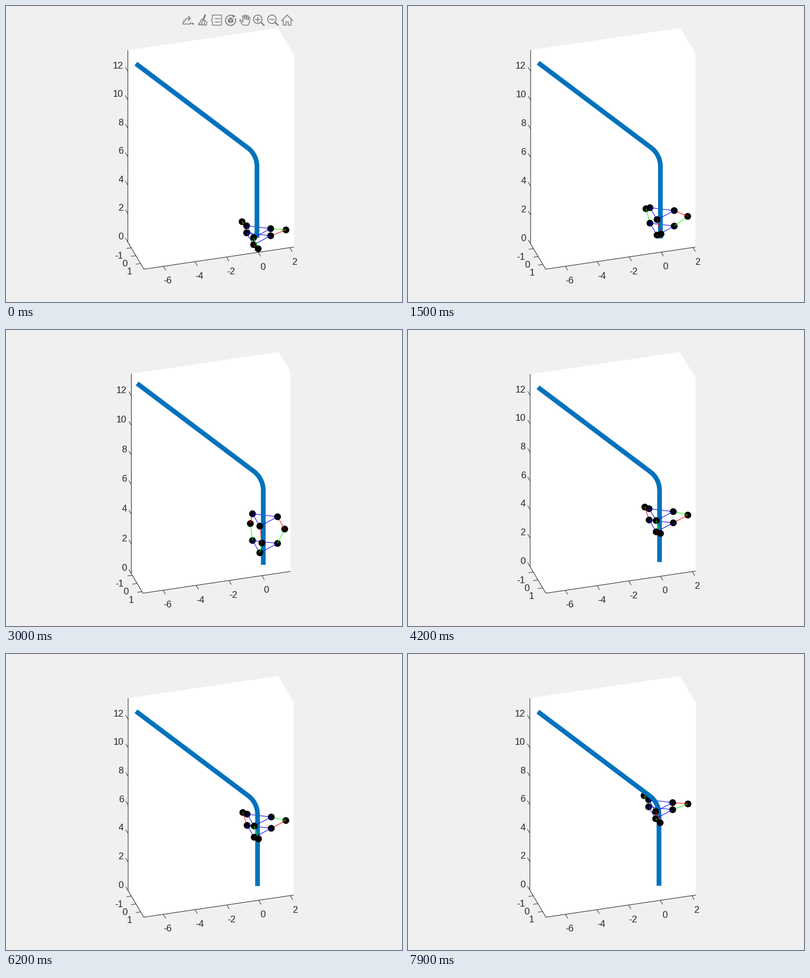
A matplotlib script for the animation above (8 s loop, 700 px wide and 525 px high).

```python
import numpy as np
import matplotlib.pyplot as plt
from matplotlib.animation import FuncAnimation
from matplotlib.patches import Polygon, Circle, Arc

W, H = 700, 525
PT = 0.72                       # points per pixel at 100 dpi
GREY, INK, ICON = "#f0f0f0", "#262626", "#808080"
PIPE_BLUE = "#0072bd"

# Camera and the plot area the box is fitted into
AZ, EL = np.radians([16.5, 30])
SA, CA, SE, CE = np.sin(AZ), np.cos(AZ), np.sin(EL), np.cos(EL)
TOP, FLOOR, MID_X = 39.0, 466.8, 362.25

# Robot: two triangles of side 1.5 joined by three unit-link elbows
SIDE = 1.5
APEX = SIDE * np.sqrt(3) / 2
FEET = np.array([[0, -SIDE / 2], [0, SIDE / 2], [APEX, 0]])
OUT = np.array([[0, -1], [0, 1], [1, 0]])
GAP_MIN, GAP_MAX, HALF = 0.5, 1.8, 10

# Pipe: straight 5, bend of radius 2 over 45 degrees, straight 10
turn = np.linspace(0, np.pi / 4, 30)
bend_x, bend_z = APEX / 3 - 2 * (1 - np.cos(turn)), 5 + 2 * np.sin(turn)
reach = 10 * np.sqrt(0.5)
pipe_x = np.r_[APEX / 3, bend_x, bend_x[-1] - reach]
pipe_z = np.r_[0, bend_z, bend_z[-1] + reach]
PIPE = np.c_[pipe_x, 0 * pipe_x, pipe_z]
X_MIN, Z_MAX = pipe_x[-1], pipe_z[-1]

fig = plt.figure(figsize=(7, 5.25), dpi=100, facecolor=GREY)
ax = fig.add_axes([0, 0, 1, 1])


def stroke(pts, color, width, z=1, **kw):
    pts = np.asarray(pts, float)
    kw.setdefault("solid_capstyle", "butt")
    ax.plot(pts[:, 0], pts[:, 1], color=color, lw=width * PT, zorder=z, **kw)


def label(x, y, value, align):
    ax.text(x, y, str(value), family="Liberation Sans", fontsize=16.67 * PT,
            color=INK, ha=align, va="center_baseline", zorder=3)


def pose(i):
    """Heights of the lower and upper triangle, and whether it is stretching."""
    cycle, k = divmod(i, 2 * HALF)
    travel = GAP_MAX - GAP_MIN
    base = cycle * travel
    step = travel * (k % HALF) / (HALF - 1)
    if k < HALF:
        return base, base + GAP_MIN + step, True
    return base + step, base + GAP_MAX, False


def depth(p):
    return CE * (p[1] * CA - p[0] * SA) + p[2] * SE


def camera(x_max, y_max):
    """Orthographic projection of a tight, equal-scaled box."""
    xr, yr = x_max - X_MIN, 2 * y_max
    s = (FLOOR - TOP) / ((xr * SA + yr * CA) * SE + Z_MAX * CE)
    left = MID_X - s * (xr * CA + yr * SA) / 2

    def project(p):
        x, y, z = np.moveaxis(np.asarray(p, float), -1, 0)
        u = left + s * ((x - X_MIN) * CA + (y + y_max) * SA)
        v = FLOOR - s * (((x - X_MIN) * SA + (y_max - y) * CA) * SE + z * CE)
        return np.stack([u, v], -1)

    return project


def draw_box(project, x_max, y_max):
    a, b, c, d = X_MIN, x_max, -y_max, y_max
    hexagon = [(a, c, 0), (a, c, Z_MAX), (b, c, Z_MAX),
               (b, d, Z_MAX), (b, d, 0), (a, d, 0)]
    ax.add_patch(Polygon(project(hexagon), fc="white", ec="none", zorder=0))
    stroke(project([(a, c, Z_MAX), (a, c, 0), (a, d, 0), (b, d, 0)]), INK, 1,
           solid_joinstyle="miter")

    along_x, along_y = np.array([CA, -SA * SE]), np.array([SA, CA * SE])
    along_x, along_y = (8.5 * v / np.hypot(*v) for v in (along_x, along_y))

    def tick(point, step, dx, dy, value, align):
        p = project(point)
        q = p + step
        stroke([p, q], INK, 0.9)
        label(q[0] + dx, q[1] + dy, value, align)

    for z in range(0, 13, 2):
        tick((a, c, z), -along_y, -3.6, -3.8, z, "right")
    for y in (-1, 0, 1):
        tick((a, y, 0), -along_x, -6.4, 12.3, y, "right")
    for x in range(-6, 3, 2):
        if x <= x_max:
            tick((x, d, 0), along_y, 3.7, 17.3, x, "center")


def draw_robot(project, low, high, spread, stretching):
    ring = lambda xy, z: np.c_[xy, np.full(3, z)]
    lower, upper = ring(FEET, low), ring(FEET, high)
    elbows = ring(FEET + spread * OUT, (low + high) / 2)

    links = []
    for j in range(3):
        k = (j + 1) % 3
        links += [(lower[j], lower[k], "#0000ff"), (upper[j], upper[k], "#0000ff")]
    up, down = ("#00ff00", "#ff0000") if stretching else ("#ff0000", "#00ff00")
    for j in range(3):
        links += [(upper[j], elbows[j], up), (lower[j], elbows[j], down)]

    # Paint from far to near; the pipe separates the back half from the front
    items = [((a + b) / 2, (a, b), color) for a, b, color in links]
    items += [(p, None, "black") for p in np.r_[lower, upper, elbows]]
    items.sort(key=lambda it: depth(it[0]))
    for n, (mid, ends, color) in enumerate(items):
        z = (10 if mid[1] < -1e-9 else 50) + n
        if ends is None:
            ax.add_patch(Circle(project(mid), 6, fc=color, ec="none", zorder=z))
        else:
            stroke(project(ends), color, 1, z)


def draw_toolbar():
    def line(*pts, w=1.6):
        stroke(pts, ICON, w, solid_capstyle="round", solid_joinstyle="round")

    def fill(*pts):
        ax.add_patch(Polygon(pts, fc=ICON, ec="none"))

    def ring(x, y, r, w=1.6):
        ax.add_patch(Circle((x, y), r, fc="none", ec=ICON, lw=w * PT))

    # export
    line((314, 26), (313, 32), (326, 32), (326, 29))
    line((316, 28), (317, 24), (320, 22), (325, 22))
    line((322, 18), (326, 22), (322, 26))
    fill((326, 30), (332, 30), (332, 34))
    # brush
    line((352, 16), (349, 24), w=3)
    fill((345, 23), (354, 26), (354, 28), (344, 25))
    line((345, 26), (340, 33), (354, 34), (355, 28))
    line((347, 28), (345, 33))
    line((351, 29), (350, 33))
    # data tip
    line((365, 16), (381, 16), (381, 34), (365, 34), (365, 28), (363, 25),
         (365, 22), (365, 16), w=1.4)
    line((369, 22), (378, 22), w=1.4)
    line((369, 28), (378, 28), w=1.4)
    # rotate
    ax.add_patch(Arc((397, 25.5), 18, 18, theta1=-25, theta2=300,
                     ec=ICON, lw=1.8 * PT))
    fill((400, 15), (406, 18), (401, 21))
    fill((397, 20), (402, 23), (402, 28), (397, 31), (392, 28), (392, 23))
    stroke([(393, 23.5), (397, 25.5), (401, 23.5)], GREY, 1, 2)
    stroke([(397, 25.5), (397, 30)], GREY, 1, 2)
    # hand
    line((418, 28), (414, 24), (413, 26), (419, 34), (428, 34), (431, 27),
         (431, 20), (429, 20), (428, 25), (428, 17), (426, 17), (425, 24),
         (424, 16), (422, 16), (422, 24), (420, 17), (418, 18), (419, 28), w=1.4)
    # zoom in and out
    for x in (445, 470):
        ring(x, 23.5, 7.5)
        line((x + 5.5, 29), (x + 11, 34), w=2.4)
        line((x - 4, 23.5), (x + 4, 23.5))
    line((445, 19.5), (445, 27.5))
    # home
    line((487, 26), (497, 16), (507, 26))
    line((490, 25), (490, 34), (495, 34), (495, 28), (499, 28), (499, 34),
         (504, 34), (504, 25), w=1.5)


def draw(i):
    ax.clear()
    ax.set(xlim=(0, W), ylim=(H, 0))
    ax.axis("off")
    low, high, stretching = pose(i)
    spread = np.sqrt(1 - ((high - low) / 2) ** 2)
    x_max, y_max = APEX + spread, SIDE / 2 + spread
    project = camera(x_max, y_max)
    draw_box(project, x_max, y_max)
    stroke(project(PIPE), PIPE_BLUE, 8.33, 40)
    draw_robot(project, low, high, spread, stretching)
    if i == 0:
        draw_toolbar()
    return []


anim = FuncAnimation(fig, draw, frames=80, interval=100, repeat=True,
                     repeat_delay=0, init_func=lambda: [])
plt.show()
```
